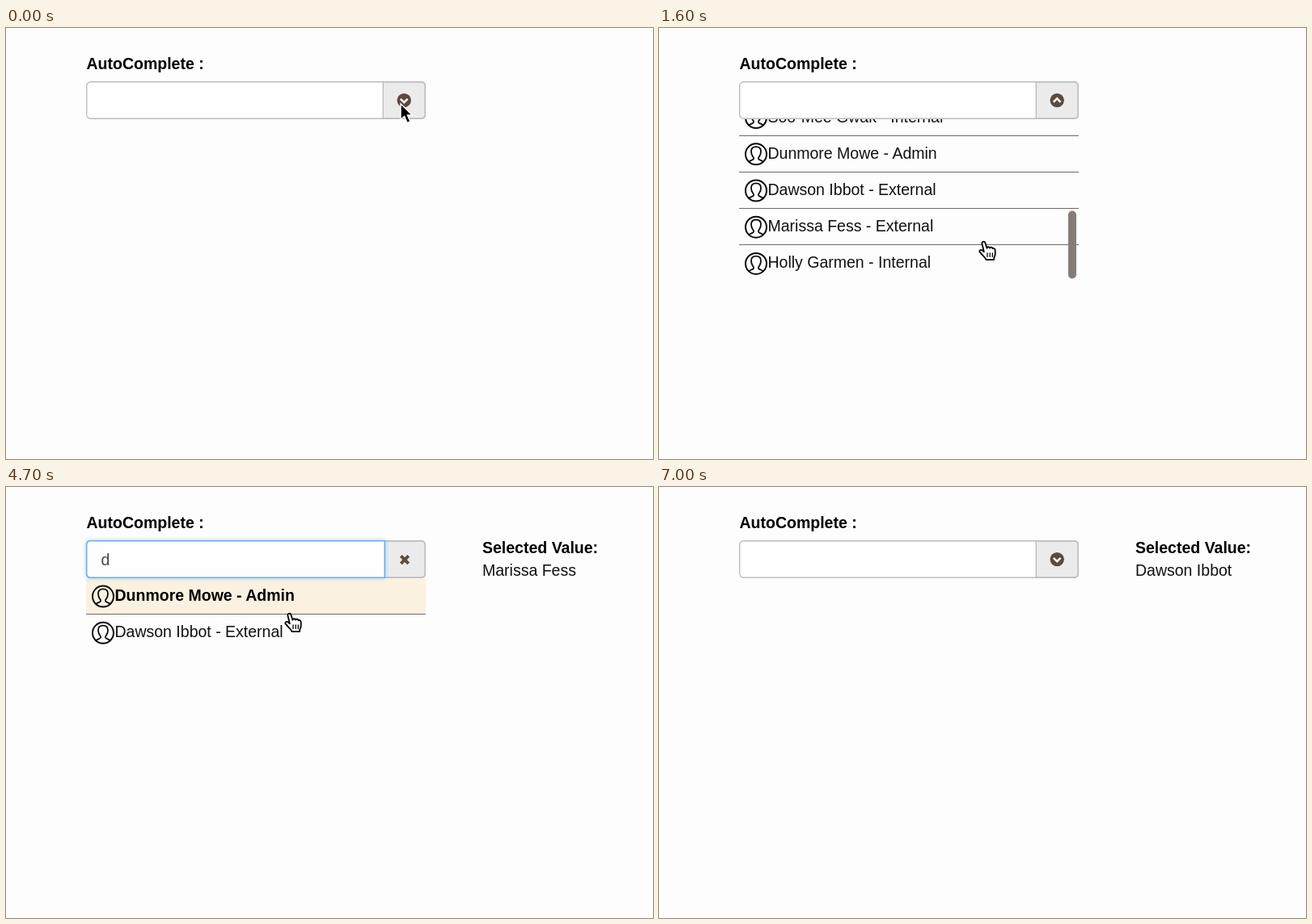
Recreate the animation shown at these times as an HTML page. Size 800 by 534 pixels, loop 7.1 s.

```html
<!DOCTYPE html>
<html lang="en">
<head>
<meta charset="utf-8">
<title>AutoComplete</title>
<style>
html, body { margin: 0; width: 100%; height: 100%; overflow: hidden; background: #fdfdfd; }
svg { display: block; width: 100vw; height: 100vh; }
text { font: 19.5px "Liberation Sans", Arial, Helvetica, sans-serif; fill: #111; }
.bold, .hot text { font-weight: bold; fill: #000; }
#value { fill: #484848; }
.row rect { fill: #fdfdfd; }
.hot rect { fill: #fbf1e1; }
.row .line { stroke: #6f6968; stroke-width: 1; shape-rendering: crispEdges; }
.last .line { display: none; }
#glow { fill: #fefefe; stroke: #66afe9; stroke-width: 1.5; filter: drop-shadow(0 0 2.5px rgba(102, 175, 233, .6)); }
</style>
</head>
<body>
<svg viewBox="0 0 800 534">
  <defs>
    <clipPath id="window"><rect x="99" y="112" width="420" height="201.5"/></clipPath>
    <g id="user" fill="none" stroke="#0c0c0c" stroke-linecap="round" stroke-linejoin="round">
      <circle r="13" stroke-width="2"/>
      <path stroke-width="1.8" d="M-8.6 9.4C-7.4 7.6-3.2 7.4-2.9 5.6C-2.7 4.4-3.3 3.8-4.2 2.6C-5.6.6-6-1.6-6-3.6C-6-7.2-3.6-9.2 0-9.2S6-7.2 6-3.6C6-1.6 5.6.6 4.2 2.6C3.3 3.8 2.7 4.4 2.9 5.6C3.2 7.4 7.4 7.6 8.6 9.4"/>
    </g>
  </defs>

  <text class="bold" x="99.5" y="51">AutoComplete :</text>

  <g id="list" clip-path="url(#window)">
    <g id="rows"></g>
    <rect id="thumb" x="506" width="10" height="84" rx="5" fill="#857c78"/>
  </g>

  <rect x="99.7" y="66.7" width="418.6" height="45.6" rx="5" fill="#fefefe"/>
  <path id="button" fill="#ebebeb" stroke="#bebebe" stroke-width="1.4"/>
  <rect x="99.7" y="66.7" width="418.6" height="45.6" rx="5" fill="none" stroke="#bebebe" stroke-width="1.4"/>
  <path id="glow" d="M104.7 66.7H468.3V112.3H104.7Q99.7 112.3 99.7 107.3V71.7Q99.7 66.7 104.7 66.7Z"/>
  <text id="value" x="117.5" y="96.5"></text>

  <g id="chevron">
    <circle cx="492.2" cy="89.6" r="8.7" fill="#5a4a40"/>
    <path id="tick" fill="none" stroke="#f4f2f0" stroke-width="2.6"/>
  </g>
  <path id="cross" d="M488.3 85.4L497.7 94.8M497.7 85.4L488.3 94.8" stroke="#5b4d41" stroke-width="4"/>

  <g id="result">
    <text class="bold" x="589" y="82">Selected Value:</text>
    <text id="picked" x="589" y="110"></text>
  </g>

  <path id="arrow" d="M0 0V19.5L4.6 15.4L8 23.4L11.8 21.8L8.4 14H14.4Z" fill="#000" stroke="#fff" stroke-width="1.4"/>
  <g id="hand" fill="#fff" stroke="#000" stroke-linejoin="round" stroke-linecap="round">
    <path d="M-2.6 1C-3.2-1.4.6-2.2 1.3 0L3.4 6.8C3.6 4.8 6.6 4.7 7.1 6.7C7.8 5.2 10.2 5.4 10.6 7.4C11.6 6.4 13.7 7.2 13.7 9.4V14.2C13.7 16.2 12 17.6 12 21.2H2.4C2 18.6-2.2 15.8-5.4 11.4C-6.6 9.6-4 8-2.4 9.4L-.2 11.2Z" stroke-width="1.8"/>
    <path d="M4 12.8V17.4M7.2 12.8V17.4M10.3 12.8V17.4" stroke-width="1.3"/>
  </g>
  <path id="beam" d="M-3.5-9.5Q0-9.5 0-7Q0-9.5 3.5-9.5M0-7V7M-3.5 9.5Q0 9.5 0 7Q0 9.5 3.5 9.5M-2 3H2" fill="none" stroke="#222" stroke-width="1.4"/>
</svg>
<script>
const LOOP = 7100, TICK = 100, PITCH = 45.2, TOP = 112, END = 250.5;
const people = [
  ["Jan Brockemann", "Admin"], ["Silke Brockemann", "Internal"],
  ["Balma Lajos", "Internal"], ["Balma Edit", "External"],
  ["Tae-Jin Gwak", "Internal"], ["Soo-Mee Gwak", "Internal"],
  ["Dunmore Mowe", "Admin"], ["Dawson Ibbot", "External"],
  ["Marissa Fess", "External"], ["Holly Garmen", "Internal"]
];
const FIRST = 8, SECOND = 7;
const $ = id => document.getElementById(id);
const show = (el, on) => el.setAttribute("visibility", on ? "inherit" : "hidden");
const place = (el, x, y) => el.setAttribute("transform", `translate(${x} ${y})`);
const label = i => people[i].join(" - ");
const within = (t, a, b) => t >= a && t < b;

$("rows").innerHTML = people.map((p, i) => `<g class="row">
  <rect x="99" width="420" height="${PITCH}"/>
  <use href="#user" x="120" y="23.6"/>
  <text x="134.5" y="29">${label(i)}</text>
  <path class="line" d="M99 45.5H519"/></g>`).join("");
const rows = [...$("rows").children];
// Later rows must not cover the line of the row above
rows.forEach(r => $("rows").prepend(r));

// time, x, y, cursor shape
const path = [
  [0, 488, 94, "arrow"], [900, 488, 94, "arrow"],
  [1000, 446, 190, "hand"], [1100, 402, 266, "hand"], [1700, 402, 266, "hand"],
  [1800, 402, 256, "hand"], [1900, 401, 246, "hand"],
  [2000, 401, 236, "arrow"], [2200, 401, 228, "arrow"], [2300, 401, 228, "arrow"],
  [2400, 408, 196, "arrow"], [2500, 462, 128, "arrow"],
  [2600, 507, 81, "hand"], [2800, 500, 85, "hand"], [3100, 490, 90, "hand"],
  [3200, 490, 93, "arrow"], [3400, 490, 93, "arrow"],
  [3500, 430, 96, "beam"], [3600, 380, 97, "beam"], [4000, 380, 97, "beam"],
  [4100, 380, 97, "none"], [4500, 380, 97, "none"],
  [4600, 366, 124, "hand"], [4700, 351, 158, "hand"],
  [4800, 348, 174, "hand"], [4900, 347, 178, "hand"], [5000, 347, 178, "hand"],
  [5100, 347, 178, "arrow"], [5300, 364, 162, "arrow"], [5500, 430, 118, "beam"],
  [5600, 474, 96, "hand"], [5800, 489, 89.5, "hand"], [6000, 489, 89.5, "hand"],
  [6100, 489, 90, "arrow"], [6400, 491, 91, "arrow"], [7000, 491, 91, "none"]
];

function cursorAt(t) {
  const n = path.findLastIndex(p => p[0] <= t);
  const a = path[n], b = path[n + 1] || a;
  const k = b === a ? 0 : (t - a[0]) / (b[0] - a[0]);
  return { x: a[1] + (b[1] - a[1]) * k, y: a[2] + (b[2] - a[2]) * k, shape: a[3] };
}

function scrollAt(t) {
  if (!within(t, 1400, 2000)) return 0;
  const k = Math.min(1, (t - 1300) / 300);
  return END * (1 - (1 - k) ** 2);
}

function hoverAt(t) {
  if (within(t, 1100, 1600)) return 3;
  if (within(t, 1800, 2000)) return FIRST;
  if (within(t, 4800, 5100)) return SECOND;
  return -1;
}

function draw(t) {
  const typed = within(t, 4100, 5100), filtered = within(t, 4200, 5100);
  const open = within(t, 400, 2000) || within(t, 3800, 5100);
  const value = within(t, 2000, 3200) ? label(FIRST)
    : within(t, 5100, 6100) ? label(SECOND) : typed ? "d" : "";
  const scroll = scrollAt(t), hover = hoverAt(t);

  show($("list"), open);
  const shown = rows.filter((r, i) => !filtered || people[i][0].startsWith("D"));
  rows.forEach((row, i) => {
    const n = shown.indexOf(row);
    show(row, n >= 0);
    place(row, 0, TOP + n * PITCH - scroll);
    row.classList.toggle("hot", n === 0 || i === hover);
    row.classList.toggle("last", n === shown.length - 1);
  });
  show($("thumb"), scroll > 0);
  $("thumb").setAttribute("y", 114.5 + scroll / END * 112);

  $("value").textContent = value;
  const split = value ? 468.3 : 466.3;
  $("button").setAttribute("d", `M${split} 66.7H513.3Q518.3 66.7 518.3 71.7V107.3Q518.3 112.3 513.3 112.3H${split}Z`);
  show($("cross"), value);
  show($("chevron"), !value);
  $("tick").setAttribute("d", open ? "M487.8 91.8L492.2 87.4L496.6 91.8" : "M487.8 87.8L492.2 92.2L496.6 87.8");

  const glow = Math.min((t - 3700) / 200, (5200 - t) / 200);
  $("glow").style.opacity = Math.max(0, Math.min(1, glow));

  show($("result"), t >= 2000);
  $("picked").textContent = people[t < 5100 ? FIRST : SECOND][0];

  const c = cursorAt(t);
  for (const id of ["arrow", "hand", "beam"]) {
    show($(id), id === c.shape);
    place($(id), c.x, c.y);
  }
}

const start = performance.now();
function frame() {
  const t = (performance.now() - start) % LOOP;
  draw(Math.floor(t / TICK) * TICK);
  requestAnimationFrame(frame);
}
frame();
</script>
</body>
</html>
```
